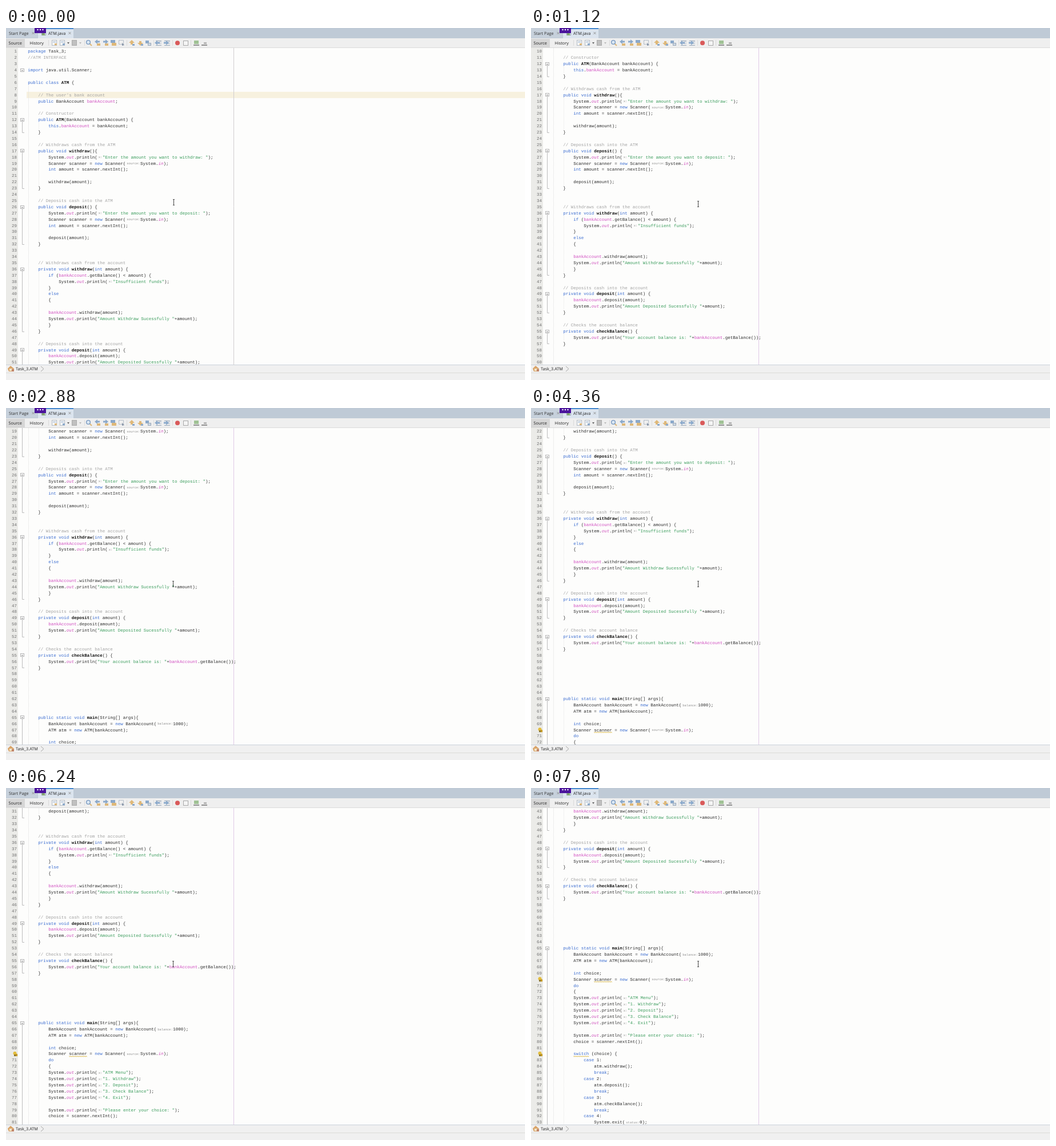
Animation, 908 px wide and 617 px high, one loop 8 s. Source, as an HTML page with a canvas:

```html
<!DOCTYPE html>
<html lang="en">
<head>
<meta charset="utf-8">
<title>Code editor scrolling</title>
<style>
html, body { margin: 0; width: 100%; height: 100%; overflow: hidden; background: #f0f0f0; }
canvas { display: block; }
</style>
</head>
<body>
<canvas id="stage" width="908" height="617"></canvas>
<script>
const code = `package Task_3;
//ATM INTERFACE

import java.util.Scanner;

public class ATM {

    // The user's bank account
    public BankAccount bankAccount;

    // Constructor
    public ATM(BankAccount bankAccount) {
        this.bankAccount = bankAccount;
    }

    // Withdraws cash from the ATM
    public void withdraw(){
        System.out.println(«x:»"Enter the amount you want to withdraw: ");
        Scanner scanner = new Scanner(«source:»System.in);
        int amount = scanner.nextInt();

        withdraw(amount);
    }

    // Deposits cash into the ATM
    public void deposit() {
        System.out.println(«x:»"Enter the amount you want to deposit: ");
        Scanner scanner = new Scanner(«source:»System.in);
        int amount = scanner.nextInt();

        deposit(amount);
    }


    // Withdraws cash from the account
    private void withdraw(int amount) {
        if (bankAccount.getBalance() < amount) {
            System.out.println(«x:»"Insufficient funds");
        }
        else
        {

        bankAccount.withdraw(amount);
        System.out.println("Amount Withdraw Sucessfully "+amount);
        }
    }

    // Deposits cash into the account
    private void deposit(int amount) {
        bankAccount.deposit(amount);
        System.out.println("Amount Deposited Sucessfully "+amount);
    }

    // Checks the account balance
    private void checkBalance() {
        System.out.println("Your account balance is: "+bankAccount.getBalance());
    }







    public static void main(String[] args){
        BankAccount bankAccount = new BankAccount(«balance:»1000);
        ATM atm = new ATM(bankAccount);

        int choice;
        Scanner scanner = new Scanner(«source:»System.in);
        do
        {
        System.out.println(«x:»"ATM Menu");
        System.out.println(«x:»"1. Withdraw");
        System.out.println(«x:»"2. Deposit");
        System.out.println(«x:»"3. Check Balance");
        System.out.println(«x:»"4. Exit");

        System.out.println(«x:»"Please enter your choice: ");
        choice = scanner.nextInt();

        switch (choice) {
            case 1:
                atm.withdraw();
                break;
            case 2:
                atm.deposit();
                break;
            case 3:
                atm.checkBalance();
                break;
            case 4:
                System.exit(«status:»0);`.split("\n");

const LOOP = 8000, ROW = 10.9, CHAR = 4.5, LEFT = 38.3, FIRST_ROW = 41;
const EDITOR_TOP = 35, EDITOR_BOTTOM = 590;
const MONO = '"Liberation Mono", monospace', UI = '"Open Sans", sans-serif';

// Each wheel notch moves the view by three lines.
const notches = [320, 480, 640, 2000, 2160, 2320, 3840, 4400, 4560, 4720, 6560, 6720, 6880, 7040];
const folds = [[4, 4], [12, 14], [17, 23], [26, 32], [36, 46], [49, 52], [55, 57], [65, 110]];
const hints = { 70: [16, 7], 82: [8, 6] }; // line: underlined column and length

const tokenRule = new RegExp([
  "(?<hint>«.*?»)", "(?<comment>//.*)", '(?<string>".*?")',
  "(?<static>(?<=System\\.)(?:out|in)\\b)",
  "(?<field>bankAccount(?=\\.)|(?<=this\\.|public BankAccount )bankAccount)",
  "(?<name>(?<=void |class )\\w+|ATM(?=\\(B))",
  "(?<keyword>\\b(?:package|import|public|private|class|this|void|int|new|if|else|static|do|switch|case|break)\\b)",
  "(?<plain>\\w+|[^\\w\\s])"
].join("|"), "g");
const styles = {
  hint: ["#8c8c8c", ""], comment: ["#a2a2a2", ""], string: ["#3a9c5c", ""],
  static: ["#cf50bd", "italic"], field: ["#d04cc0", ""], name: ["#111", "bold"],
  keyword: ["#3a6cd0", ""], plain: ["#2c2c2c", ""]
};

const c = document.getElementById("stage").getContext("2d");
c.textRendering = "geometricPrecision";

function box(x, y, w, h, color) {
  c.fillStyle = color;
  c.fillRect(x, y, w, h);
}
function frame(x, y, w, h, color) {
  c.strokeStyle = color;
  c.strokeRect(x + .5, y + .5, w - 1, h - 1);
}
function line(color, width, ...points) {
  c.strokeStyle = color;
  c.lineWidth = width;
  c.beginPath();
  for (let i = 0; i < points.length; i += 2) c.lineTo(points[i], points[i + 1]);
  c.stroke();
  c.lineWidth = 1;
}
function shape(color, ...points) {
  c.fillStyle = color;
  c.beginPath();
  for (let i = 0; i < points.length; i += 2) c.lineTo(points[i], points[i + 1]);
  c.fill();
}
function disc(x, y, r, color) {
  c.fillStyle = color;
  c.beginPath();
  c.arc(x, y, r, 0, 7);
  c.fill();
}
function text(str, x, y, color, font) {
  c.font = font;
  c.fillStyle = color;
  c.fillText(str, x, y);
}
const label = (str, x, y, color = "#222") => text(str, x, y, color, `7.3px ${UI}`);

function drawCodeLine(str, y) {
  let shift = 0;
  for (const m of str.matchAll(tokenRule)) {
    const kind = Object.keys(styles).find(k => m.groups[k] !== undefined);
    const [color, face] = styles[kind];
    const x = LEFT + m.index * CHAR + shift;
    if (kind === "hint") {
      const word = m[0].slice(1, -1);
      text(word, x + 2, y + 2, color, `5.5px ${MONO}`);
      shift += word.length * 3.3 + 2.6 - m[0].length * CHAR;
    } else {
      text(m[0], x, y + 2.3, color, `${face} 7.5px ${MONO}`);
    }
  }
}

function drawBulb(y) {
  disc(15.5, y - 1, 3, "#e3bd3c");
  box(14, y + 1, 3, 3, "#8a7430");
  box(17, y, 3, 4, "#c69a22");
}

function drawFold(from, to, rowY) {
  const y = Math.round(rowY(from)), end = Math.round(rowY(to)) + .5;
  if (to > from) line("#bdbdbd", 1, 28.5, y + 3, 28.5, end, 32, end);
  box(25, y - 3, 7, 6, "#fdfdfd");
  frame(25, y - 3, 7, 6, "#b4b4b4");
  line("#888", 1, 27, y + .5, 30, y + .5);
}

function drawEditor(top) {
  const rowY = n => FIRST_ROW + (n - top) * ROW;
  c.save();
  c.beginPath();
  c.rect(0, EDITOR_TOP, 908, EDITOR_BOTTOM - EDITOR_TOP);
  c.clip();
  box(0, EDITOR_TOP, 908, 555, "#fdfdfc");
  box(0, EDITOR_TOP, 21, 555, "#ebebe8");
  box(36, rowY(8) - 5.5, 872, 11, "#f7f1df");

  c.setLineDash([1, 1]);
  line("#dedede", 1, 39.5, rowY(7) - 5, 39.5, 590);
  for (const [from, to] of folds)
    if (to > from) line("#e6e6e6", 1, 57.5, rowY(from) + 5, 57.5, rowY(to) - 5);
  c.setLineDash([]);

  for (const [from, to] of folds) drawFold(from, to, rowY);
  line(top === 1 ? "#d0cdd0" : "#dfc8e6", 1, 398.5, EDITOR_TOP, 398.5, 590);

  for (let n = top; n <= top + 50; n++) {
    const y = rowY(n);
    drawCodeLine(code[n - 1] || "", y);
    if (hints[n]) {
      const [col, len] = hints[n], x = LEFT + col * CHAR, wave = [];
      for (let i = 0; i <= len * CHAR; i += 1.5) wave.push(x + i, y + 4 + (i / 1.5 % 2) * .9);
      line("#d9b53e", 1, ...wave);
      drawBulb(y);
    } else {
      c.textAlign = "right";
      text(n, 19, y + 2.3, "#707070", `7.5px ${MONO}`);
      c.textAlign = "left";
    }
  }
  c.restore();
}

function drawTabs() {
  box(0, 0, 908, 18, "#bfcad6");
  box(0, 0, 55, 17, "#c6d0db");
  label("Start Page", 5, 11.5, "#333");
  box(56, 0, 62, 18, "#dbe4ee");
  box(56, 0, 62, 2, "#4b8bd0");
  box(62, 5, 8, 8, "#eef2f4");
  frame(62, 5, 8, 8, "#98a6b6");
  box(63, 9, 5, 4, "#84a872");
  label("ATM.java", 74, 11.5);
  for (const x of [47.5, 111.5]) {
    line("#888", .9, x - 2, 7, x + 2, 11);
    line("#888", .9, x + 2, 7, x - 2, 11);
  }
  box(50, 0, 20, 9, "#4b159c");
  for (const x of [55.5, 60, 64.5]) disc(x, 3, 1.2, "#fff");
}

const BLUE = "#8ba9cb", GOLD = "#dfb878", GREY = "#b5b5b5", SLATE = "#9aa8b8";

function page(x, mark) {
  box(x - 5, 21, 9, 10, "#f5f5f5");
  frame(x - 5, 21, 9, 10, "#b4bdc8");
  box(x - 3, 24, 5, 1, BLUE);
  box(x, 27, 4, 3, mark);
}
function arrow(x, y, dir, color) {
  shape(color, x - 4 * dir, y - 1.5, x, y - 1.5, x, y - 4, x + 5 * dir, y, x, y + 4, x, y + 1.5, x - 4 * dir, y + 1.5);
}
function vertical(x, dir, color) {
  shape(color, x - 5, 26, x, 26 - 5 * dir, x + 5, 26, x + 2, 26, x + 2, 26 + 3 * dir, x - 2, 26 + 3 * dir, x - 2, 26);
}
function indent(x, dir) {
  for (const y of [22, 30]) box(x - 5, y, 10, 1, SLATE);
  for (const y of [24, 27]) box(x, y, 5, 1, "#b4c1d0");
  arrow(x - 2, 26, dir, BLUE);
}

function drawToolbar() {
  box(0, 18, 908, 17, "#efefef");
  box(0, 19, 33, 15, "#d6d6d6");
  label("Source", 4.5, 28.7);
  label("History", 41.5, 28.7);
  for (const x of [74, 137, 211, 258, 291, 323]) box(x, 21, 1, 10, "#dadada");
  page(85, GOLD);
  page(99, BLUE);
  box(115, 21, 9, 10, "#c0c0c0");
  frame(115, 21, 9, 10, "#ababab");
  shape("#666", 107, 25, 111, 25, 109, 28);
  shape("#bbb", 128, 25, 132, 25, 130, 28);

  line(GOLD, 2, 146, 27, 150, 31);
  disc(144, 25, 4, "#7596bf");
  disc(144, 25, 2.7, "#dbe8f4");
  for (const [x, dir] of [[160, -1], [174, 1]]) {
    box(x - 1, 27, 6, 4, GOLD);
    arrow(x, 24, dir, BLUE);
  }
  box(183, 21, 8, 5, BLUE);
  box(185, 26, 8, 5, GOLD);
  c.setLineDash([2, 1]);
  frame(197, 21, 9, 8, SLATE);
  c.setLineDash([]);
  shape("#8290a4", 203, 26, 207, 30, 203, 31);

  vertical(220, 1, GOLD);
  vertical(235, -1, GOLD);
  box(221, 28, 4, 3, BLUE);
  box(236, 28, 4, 3, BLUE);
  box(244, 22, 6, 5, BLUE);
  box(248, 26, 6, 5, "#cdd8e4");
  frame(248, 26, 6, 5, SLATE);
  indent(267, -1);
  indent(282, 1);
  disc(300, 26.3, 4, "#d95a5a");
  box(310, 22, 9, 9, "#f5f5f5");
  frame(310, 22, 9, 9, "#a8a8a8");
  box(329, 22, 8, 6, "#a0c295");
  box(328, 29, 10, 2, "#919191");
  box(346, 25, 5, 3, GREY);
  box(342, 29, 10, 2, "#919191");
  box(0, 34, 908, 1, "#dadada");
}

function drawFooter() {
  box(0, 590, 908, 27, "#f0f0f0");
  box(0, 590, 908, 1, "#cbd2db");
  box(0, 604, 908, 1, "#dcdcd8");
  shape("#d9a468", 3, 597, 8, 592, 14, 597, 12, 602, 5, 602);
  box(6, 597, 5, 4, "#f1e4c6");
  box(10, 598, 4, 4, "#c08468");
  label("Task_3.ATM", 17, 600.3);
  line("#a5a5a5", 1, 61, 593, 66, 597.5, 61, 602);
}

function drawPointer(x, y) {
  line("#444", 1, x + .5, y - 5, x + .5, y + 5);
  for (const edge of [y - 5, y + 5])
    line("#555", 1, x - 1, edge + .5, x + 2, edge + .5);
}

function draw(now) {
  const t = now % LOOP;
  const top = 1 + 3 * notches.filter(at => t >= at).length;
  drawEditor(top);
  drawTabs();
  drawToolbar();
  drawFooter();
  if (top === 1) drawPointer(293, 305);
  else drawPointer(292, 308);
  requestAnimationFrame(draw);
}
draw(0);
</script>
</body>
</html>
```
